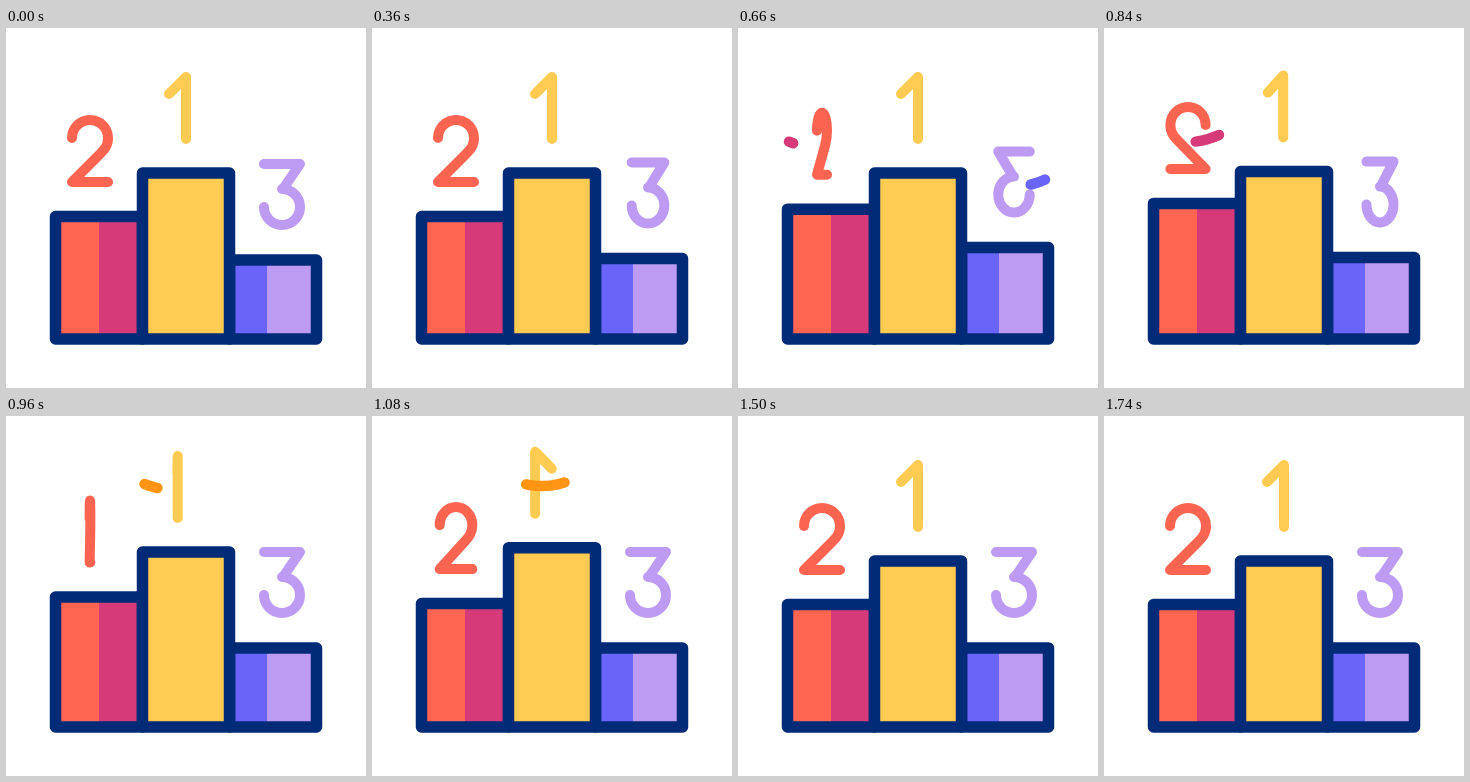
An HTML page with a canvas that plays this animation: 360x360 px, repeating every 1800 ms.

```html
<!DOCTYPE html>
<html lang="en">
<head>
<meta charset="utf-8">
<title>Podium</title>
<style>
html, body { margin: 0; width: 100%; height: 100%; overflow: hidden; background: #fff; }
canvas { display: block; width: 360px; height: 360px; }
</style>
</head>
<body>
<canvas id="stage" width="360" height="360"></canvas>
<script>
const ctx = document.getElementById('stage').getContext('2d');
const LOOP = 1800, STEP = 30, LIFT = 13.3, BASE = 311;
const NAVY = '#022b77';

const clamp = v => Math.max(0, Math.min(1, v));
const span = (t, a, b) => clamp((t - a) / (b - a));
const smooth = u => u * u * (3 - 2 * u);

// Piecewise linear value through [time, value] pairs
function keys(t, list) {
  if (t <= list[0][0]) return list[0][1];
  for (let i = 1; i < list.length; i++) {
    const [a, v] = list[i - 1], [b, w] = list[i];
    if (t < b) return v + (w - v) * (t - a) / (b - a);
  }
  return list[list.length - 1][1];
}

const lift = t => LIFT * (smooth(span(t, 300, 590)) - smooth(span(t, 610, 925)));

function turn(t) {
  const u = span(t, 290, 945);
  return Math.cos(Math.PI * (u + smooth(u)));
}

const head = t => keys(t, [[445, 0.01], [600, 0.84], [630, 1]]);
const tail = t => keys(t, [[445, 0], [505, 0], [600, 0.24], [645, 0.74], [665, 0.78], [715, 1]]);

// Digit outlines relative to their centres
function one(c) {
  c.moveTo(-8.5, -13);
  c.lineTo(8.5, -30);
  c.lineTo(8.5, 32);
}
function two(c) {
  c.moveTo(-18, -13);
  c.arc(0, -13, 18, Math.PI, 0);
  c.bezierCurveTo(18, -5, 14, -1, 10, 3);
  c.lineTo(-18, 31);
  c.lineTo(18, 31);
}
function three(c) {
  c.moveTo(-18, -31);
  c.lineTo(18, -31);
  c.lineTo(1, -6);
  c.arc(0, 12, 18, -Math.PI / 2, Math.PI);
}

const places = [
  { delay: 205, x: 84, y: 123, draw: two, ink: '#fb6451', streak: '#d63a79',
    left: 49.5, right: 136.5, split: 93, top: 188.5, fill: ['#ff6550', '#d63a79'] },
  { delay: 0, x: 276, y: 167, draw: three, ink: '#bd9bf3', streak: '#6b64f8',
    left: 223.5, right: 310.5, split: 261, top: 232, fill: ['#6b64f8', '#bd9bf3'] },
  { delay: 480, x: 171.5, y: 79, draw: one, ink: '#fdcb51', streak: '#ff9412',
    left: 136.5, right: 223.5, split: 180, top: 145, fill: ['#fdcb51', '#fdcb51'] }
];

function block(p, up) {
  const top = p.top - up, h = BASE - top;
  ctx.fillStyle = p.fill[0];
  ctx.fillRect(p.left, top, p.split - p.left, h);
  ctx.fillStyle = p.fill[1];
  ctx.fillRect(p.split, top, p.right - p.split, h);
  ctx.strokeStyle = NAVY;
  ctx.lineWidth = 11.5;
  ctx.strokeRect(p.left, top, p.right - p.left, h);
}

function digit(p, t, up) {
  const c = turn(t);
  ctx.save();
  ctx.translate(p.x, p.y - up);
  ctx.scale(Math.abs(c) < 0.01 ? 0.01 : c, 1);
  ctx.beginPath();
  p.draw(ctx);
  ctx.restore();
  ctx.strokeStyle = p.ink;
  ctx.lineWidth = 10;
  ctx.stroke();
}

function streak(p, t, up) {
  if (t < 435 || t >= 710) return;
  const a = tail(t), b = head(t), n = 16;
  ctx.beginPath();
  for (let i = 0; i <= n; i++) {
    const s = a + (b - a) * i / n, r = 1 - s;
    const x = -33 * r * r + 31 * s * s;
    const y = -2 * r * r + 22 * r * s - 3 * s * s;
    ctx.lineTo(p.x + x, p.y - up + y);
  }
  ctx.strokeStyle = p.streak;
  ctx.lineWidth = 10.5;
  ctx.stroke();
}

function render(time) {
  ctx.fillStyle = '#fff';
  ctx.fillRect(0, 0, 360, 360);
  ctx.lineCap = ctx.lineJoin = 'round';
  for (const p of places) block(p, lift(time - p.delay));
  for (const p of places) {
    const t = time - p.delay, up = lift(t);
    digit(p, t, up);
    streak(p, t, up);
  }
}

const start = performance.now();
function frame() {
  const t = (performance.now() - start) % LOOP;
  render(Math.floor(t / STEP) * STEP);
  requestAnimationFrame(frame);
}
frame();
</script>
</body>
</html>
```
